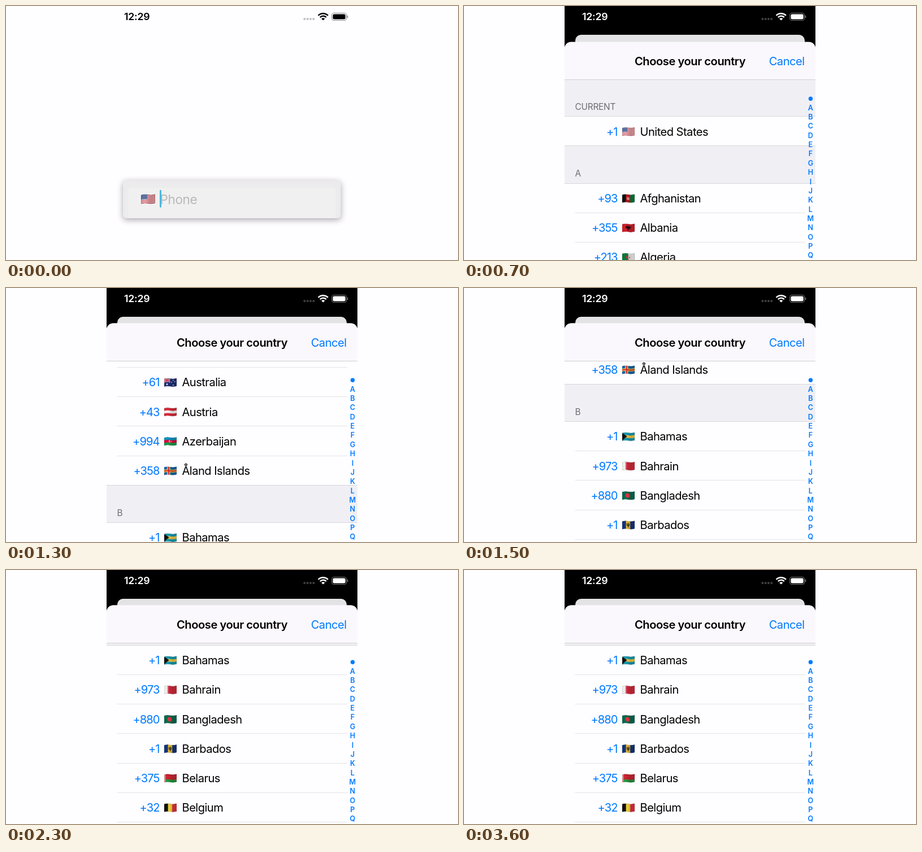
Write an HTML page with a canvas that moves like this. It is 800 by 450 pixels and loops after 3.7 s.

```html
<!DOCTYPE html>
<html lang="en">
<head>
<meta charset="utf-8">
<title>Country picker</title>
<style>
html, body { margin: 0; width: 100%; height: 100%; overflow: hidden; background: #fefdff; }
canvas { display: block; }
</style>
</head>
<body>
<canvas id="stage" width="800" height="450"></canvas>
<script>
const ctx = document.getElementById('stage').getContext('2d');
ctx.imageSmoothingQuality = 'high';

const LOOP = 3700, STEP = 100;
const LEFT = 178, WIDTH = 444;
const PAPER = '#fefdff', BLUE = '#007aff', GROUP = '#f0eff4', LINE = '#d7d6db';
const ROW = 52.2, HEADER = 66.2, NAV = 66.5;

// Flag layers: h/v stripes, r rect, o disc, p polygon, s star grid, u canton ensign
const STRIPES = 'h ' + Array.from({ length: 13 }, (_, i) => i % 2 ? '#fff' : '#d02f3f').join(' ');
const sections = [
  ['CURRENT', [
    ['+1', 'United States', STRIPES + ';r 0 0 .43 .54 #2b4a8c;s .06 .07 .08 .13 5 4 #fff']]],
  ['A', [
    ['+93', 'Afghanistan', 'v #111 #c8171e #087a3c;o .5 .5 .17 #f3d9d3;o .5 .5 .11 #c8171e;o .5 .54 .06 #fff'],
    ['+355', 'Albania', 'h #d3202b;p .5 .3 .6 .2 .6 .33 .73 .28 .68 .55 .58 .6 .5 .86 .42 .6 .32 .55 .27 .28 .4 .33 .4 .2 #2a0d10'],
    ['+213', 'Algeria', 'h #f4f4f2;r 0 0 .5 1 #0a7b3e;o .5 .5 .25 #d5243a;o .57 .5 .19 #f4f4f2;r .45 .34 .05 .32 #0a7b3e;o .6 .5 .08 #d5243a'],
    ['+1', 'American Samoa', 'h #14296b;p 1 0 0 .5 1 1 #c9253b;p 1 .08 .12 .5 1 .92 #fff;p .55 .48 .75 .38 .95 .3 .85 .6 .7 .7 #8a5a2b'],
    ['+376', 'Andorra', 'v #1a3c9c #fedf00 #d0103a;o .5 .5 .14 #b9743c'],
    ['+244', 'Angola', 'h #cc1b2b #111;o .5 .5 .2 #f6c915;o .54 .46 .13 #8b1720'],
    ['+1', 'Anguilla', 'h #1b2f77;u;o .75 .5 .2 #fff;o .75 .47 .1 #f29a2e'],
    ['+672', 'Antarctica', 'h #3c87c9;p .28 .3 .5 .22 .75 .35 .74 .65 .5 .8 .42 .6 .3 .5 #fff'],
    ['+1', 'Antigua & Barbuda', 'h #cf1f33;p 0 0 1 0 .5 1 #111;p .2 .4 .8 .4 .5 1 #1b6fc2;p .34 .67 .66 .67 .5 1 #fff;o .5 .36 .15 #fcd116'],
    ['+54', 'Argentina', 'h #75b5e3 #fff #75b5e3;o .5 .5 .13 #f1b62c'],
    ['+374', 'Armenia', 'h #d5202f #1f3f9e #f2a81d'],
    ['+297', 'Aruba', 'h #4a8fdc;r 0 .65 1 .08 #f9d616;r 0 .8 1 .08 #f9d616;o .2 .28 .13 #d2223a'],
    ['+61', 'Australia', 'h #1b2f77;u;o .25 .76 .1 #fff;o .75 .2 .06 #fff;o .62 .45 .06 #fff;o .88 .4 .06 #fff;o .75 .8 .07 #fff'],
    ['+43', 'Austria', 'h #da2837 #fff #da2837'],
    ['+994', 'Azerbaijan', 'h #0098c3 #e00034 #15a04a;o .48 .5 .14 #fff;o .52 .5 .11 #e00034;o .58 .5 .06 #fff'],
    ['+358', 'Åland Islands', 'h #1467ae;r .26 0 .24 1 #fcd13a;r 0 .33 1 .34 #fcd13a;r .33 0 .1 1 #d32536;r 0 .43 1 .14 #d32536']]],
  ['B', [
    ['+1', 'Bahamas', 'h #149cb4 #f8cd3d #149cb4;p 0 0 .42 .5 0 1 #111'],
    ['+973', 'Bahrain', 'h #d32a3c;p 0 0 .24 0 .38 .1 .24 .2 .38 .3 .24 .4 .38 .5 .24 .6 .38 .7 .24 .8 .38 .9 .24 1 0 1 #f6f4f5'],
    ['+880', 'Bangladesh', 'h #0b6b4f;o .47 .5 .29 #ea3546'],
    ['+1', 'Barbados', 'v #14357f #f8c42e #14357f;r .47 .25 .06 .55 #111;r .39 .3 .04 .26 #111;r .57 .3 .04 .26 #111;r .4 .52 .2 .07 #111'],
    ['+375', 'Belarus', 'h #cd2330 #cd2330 #26963e;r 0 0 .13 1 #e9c4c0;s .035 .08 .06 .16 2 6 #cd2330'],
    ['+32', 'Belgium', 'v #111 #fbd93c #e63240'],
    ['+501', 'Belize', 'h #d0203a #1d3f94 #1d3f94 #1d3f94 #d0203a;o .5 .5 .28 #fff']]]
];

function paintLayer(g, layer, W, H) {
  const [kind, ...args] = layer.split(' ');
  const color = args.at(-1), n = args.map(Number);
  const rect = (x, y, w, h, c) => { g.fillStyle = c; g.fillRect(x * W, y * H, w * W, h * H); };
  const disc = (x, y, r, c) => {
    g.fillStyle = c; g.beginPath(); g.arc(x * W, y * H, r * H, 0, 7); g.fill();
  };
  const count = args.length;
  if (kind === 'h') args.forEach((c, i) => rect(0, i / count, 1, 1 / count, c));
  if (kind === 'v') args.forEach((c, i) => rect(i / count, 0, 1 / count, 1, c));
  if (kind === 'r') rect(n[0], n[1], n[2], n[3], color);
  if (kind === 'o') disc(n[0], n[1], n[2], color);
  if (kind === 's')
    for (let i = 0; i < n[4]; i++)
      for (let j = 0; j < n[5]; j++) disc(n[0] + i * n[2], n[1] + j * n[3], .035, color);
  if (kind === 'p') {
    g.fillStyle = color;
    g.beginPath();
    for (let i = 0; i < count - 1; i += 2) g.lineTo(n[i] * W, n[i + 1] * H);
    g.fill();
  }
  if (kind === 'u') {
    for (const [c, w] of [['#fff', 8], ['#cf2038', 4]]) {
      g.strokeStyle = c; g.lineWidth = w; g.beginPath();
      g.moveTo(0, 0); g.lineTo(W / 2, H / 2); g.moveTo(W / 2, 0); g.lineTo(0, H / 2);
      g.moveTo(W / 4, 0); g.lineTo(W / 4, H / 2); g.moveTo(0, H / 4); g.lineTo(W / 2, H / 4);
      g.stroke();
    }
  }
}

// Paints a flat flag, then shifts and shades its columns into a wave
function makeFlag(spec) {
  const W = 88, H = 56, PAD = 8;
  const flat = new OffscreenCanvas(W, H), waved = new OffscreenCanvas(W, H + 2 * PAD);
  const g = flat.getContext('2d'), out = waved.getContext('2d');
  spec.split(';').forEach(layer => paintLayer(g, layer, W, H));
  g.strokeStyle = 'rgba(0,0,0,.25)';
  g.lineWidth = 4;
  g.strokeRect(0, 0, W, H);
  for (let x = 0; x < W; x++) {
    const u = x / W, wave = Math.sin(u * 2 * Math.PI);
    const y = PAD + 2 - 2.6 * wave - 4 * u;
    out.drawImage(flat, x, 0, 1, H, x, y, 1, H);
    out.fillStyle = `rgba(0,0,0,${.09 - .08 * wave})`;
    out.fillRect(x, y, 1, H);
  }
  return waved;
}
sections.forEach(([, rows]) => rows.forEach(row => row[2] = makeFlag(row[2])));

function drawFlag(flag, cx, cy, w) {
  const h = w * flag.height / flag.width;
  ctx.drawImage(flag, cx - w / 2, cy - h / 2, w, h);
}

function text(str, x, cy, size, color, align = 'left', weight = 400, tracking = -.028) {
  ctx.font = `${weight} ${size}px Inter, sans-serif`;
  ctx.letterSpacing = `${size * tracking}px`;
  ctx.textAlign = align;
  ctx.fillStyle = color;
  ctx.fillText(str, x, cy + size * .364);
}

function rect(x, y, w, h, color) {
  ctx.fillStyle = color;
  ctx.fillRect(x, y, w, h);
}

function round(x, y, w, h, r, color) {
  ctx.fillStyle = color;
  ctx.beginPath();
  ctx.roundRect(x, y, w, h, r);
  ctx.fill();
}

function statusBar(level) {
  const v = Math.round(255 * level), ink = `rgb(${v},${v},${v})`;
  text('12:29', 209, 19, 17.8, ink, 'left', 600, -.015);
  ctx.strokeStyle = ink;
  ctx.globalAlpha = .24;
  for (let i = 0; i < 4; i++) round(526.3 + i * 5.3, 21, 4.2, 4.2, 2.1, ink);
  ctx.globalAlpha = 1;

  ctx.lineWidth = 2.5;
  for (const r of [12, 7.6]) {
    ctx.beginPath();
    ctx.arc(561.3, 25.3, r, -Math.PI * .755, -Math.PI * .245);
    ctx.stroke();
  }
  ctx.beginPath();
  ctx.moveTo(561.3, 25.6);
  ctx.arc(561.3, 25.6, 4.3, -Math.PI * .755, -Math.PI * .245);
  ctx.fill();

  ctx.globalAlpha = .45;
  ctx.lineWidth = 1.1;
  ctx.beginPath();
  ctx.roundRect(576.6, 12.5, 26, 13, 4);
  ctx.stroke();
  round(603.7, 16.8, 1.6, 4.6, 1, ink);
  ctx.globalAlpha = 1;
  round(578.5, 14.4, 22.2, 9.2, 2.4, ink);
}

function phoneField() {
  ctx.save();
  ctx.shadowColor = 'rgba(60,50,65,.42)';
  ctx.shadowBlur = 11;
  ctx.shadowOffsetY = 3;
  round(207, 308.5, 385.5, 67.5, 6, '#ebeaec');
  ctx.restore();

  ctx.save();
  ctx.beginPath();
  ctx.roundRect(207, 308.5, 385.5, 67.5, 6);
  ctx.clip();
  ctx.shadowColor = '#f0f0f0';
  ctx.shadowBlur = 7;
  round(217, 322, 366, 60, 3, '#f0f0f0');
  ctx.restore();

  drawFlag(sections[0][1][0][2], 251.3, 342, 24.5);
  text('Phone', 272.5, 342.3, 22.6, '#b9b8bb', 'left', 400, -.02);
  round(272, 326, 3, 31, 1, '#4cb9df');
}

function countryList(top, viewTop) {
  const right = LEFT + WIDTH;
  let y = top;
  for (const [title, rows] of sections) {
    text(title, 196.5, y + HEADER - 18, 15.4, '#6d6d72', 'left', 400, -.015);
    y += HEADER;
    const start = Math.round(y), height = Math.round(rows.length * ROW);
    rect(LEFT, start, WIDTH, height, PAPER);
    rect(LEFT, start - 1, WIDTH, 1, LINE);
    rows.forEach(([code, name, flag], i) => {
      const mid = y + ROW / 2;
      if (mid > viewTop - ROW && mid < 450 + ROW) {
        text(code, 271.5, mid, 20.2, BLUE, 'right', 400, -.05);
        drawFlag(flag, 290.5, mid + .3, 22);
        text(name, 311.5, mid, 20.2, '#000');
      }
      y += ROW;
      const last = i === rows.length - 1, x = last ? LEFT : 196.5;
      rect(x, Math.round(y) - 1, (last ? right : 604) - x, 1, last ? LINE : '#e3e2e6');
    });
  }
}

function sheet(top, scroll) {
  const body = top + NAV;
  ctx.save();
  ctx.beginPath();
  ctx.roundRect(LEFT, top, WIDTH, 900, 12);
  ctx.clip();
  rect(LEFT, top, WIDTH, 900, GROUP);
  countryList(body - scroll, body);

  rect(LEFT, top, WIDTH, NAV, '#faf8fc');
  rect(LEFT, Math.round(body), WIDTH, 1, '#cfced3');
  text('Choose your country', 400, top + 33.7, 20.2, '#000', 'center', 600, -.024);
  text('Cancel', 602.5, top + 33.7, 20.2, BLUE, 'right');

  round(609.8, top + 97, 7.4, 7.4, 3.7, BLUE);
  [...'ABCDEFGHIJKLMNOPQRSTUVWXYZ'].forEach((letter, i) =>
    text(letter, 613.4, top + 116.6 + i * 16.36, 12.6, BLUE, 'center', 600, 0));
  ctx.restore();
}

// Critically damped rise of the sheet
function rise(t) {
  const x = Math.max(0, t - .4) * 30;
  return 1 - (1 + x) * Math.exp(-x);
}

// Short drag, then a decaying fling
function scrollAt(t) {
  if (t <= 1) return 61.4 * Math.max(0, (t - .8) / .2) ** 2;
  return Math.min(1081.2, Math.max(61.4, 1083.5 - 105.5 * Math.exp(-4.96 * (t - 1.5))));
}

function draw(now) {
  const t = Math.floor(now % LOOP / STEP) * STEP / 1000;
  const p = rise(t);
  rect(0, 0, 800, 450, PAPER);
  if (p > 0) {
    const inset = 19 * p, shade = Math.round(254 - 27 * p);
    rect(LEFT, 0, WIDTH, 450, '#000');
    round(LEFT + inset, 51 * p, WIDTH - 2 * inset, 900, 10 + 40 * (1 - p),
      `rgb(${shade},${shade - 1},${shade + 1})`);
    statusBar(p ** 3);
    sheet(62.5 + 820 * (1 - p), scrollAt(t));
  } else {
    statusBar(0);
    phoneField();
  }
  requestAnimationFrame(draw);
}
requestAnimationFrame(draw);
</script>
</body>
</html>
```
